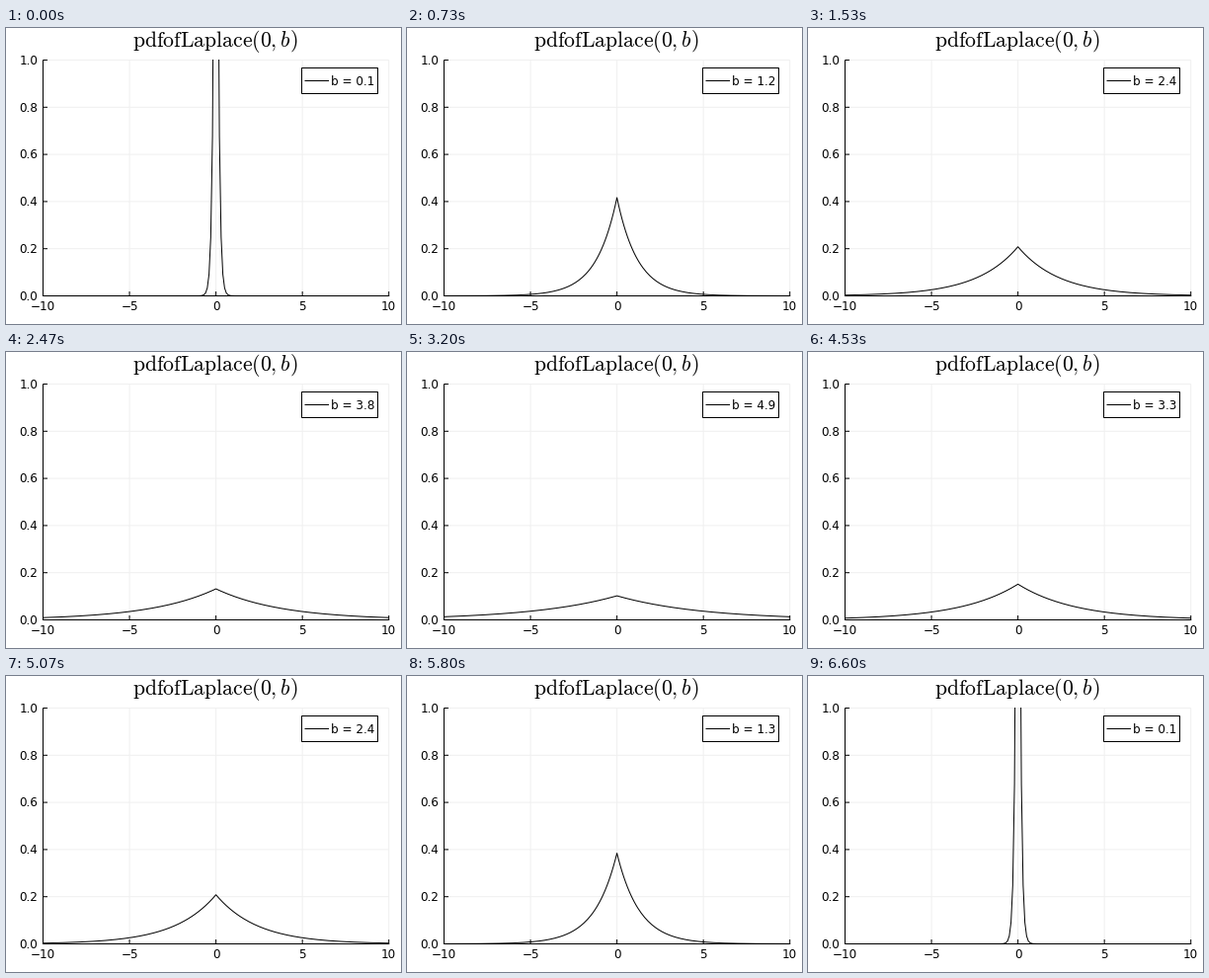
Write a matplotlib script that moves like this. It is 400 px wide and 300 px high and loops after 6670 ms.

```python
import numpy as np
import matplotlib.pyplot as plt
from matplotlib.animation import FuncAnimation
from matplotlib.collections import LineCollection
from matplotlib.patches import Rectangle

W, H, DPI = 400, 300, 100
LEFT, RIGHT, TOP, BOTTOM = 37.5, 387.7, 32.5, 271.5
LOOP_MS, TICK_MS, STEPS = 6670, 10, 100
PX = 72 / DPI  # one pixel in points

plt.rcParams.update({
    "font.family": "DejaVu Sans",
    "font.size": 12 * PX,
    "mathtext.fontset": "cm",
    "path.snap": False,
})

# One layer in pixel coordinates, y pointing down
fig = plt.figure(figsize=(W / DPI, H / DPI), dpi=DPI, facecolor="white")
ax = fig.add_axes([0, 0, 1, 1])
ax.set(xlim=(0, W), ylim=(H, 0))
ax.axis("off")


def to_x(v):
    return LEFT + (v + 10) / 20 * (RIGHT - LEFT)


def to_y(v):
    return BOTTOM - v * (BOTTOM - TOP)


def label(x, y, text, ha):
    return ax.text(x, y, text, ha=ha, va="center_baseline", zorder=5)


def strokes(segments, color, z):
    ax.add_collection(LineCollection(segments, colors=color, linewidths=PX,
                                     zorder=z), autolim=False)


grid = []
axes = [[(LEFT, TOP), (LEFT, BOTTOM + 0.5)],
        [(LEFT - 0.5, BOTTOM), (RIGHT + 0.5, BOTTOM)]]

for v in np.linspace(-10, 10, 5):
    x = to_x(v)
    grid.append([(x, TOP), (x, BOTTOM)])
    axes.append([(x, BOTTOM), (x, BOTTOM - 4.5)])
    label(x, 281, f"{v:.0f}".replace("-", "\u2212"), "center")

for v in np.linspace(0, 1, 6):
    y = to_y(v)
    grid.append([(LEFT, y), (RIGHT, y)])
    axes.append([(LEFT, y), (LEFT + 4.5, y)])
    label(32.5, y - 0.6, f"{v:.1f}", "right")

strokes(grid, "#f0f0f0", 1)
strokes(axes, "black", 2)

ax.text(211.3, 19, r"$\mathrm{pdf of Laplace}(0, b)$", ha="center",
        va="baseline", fontsize=21.7 * PX)

ax.add_patch(Rectangle((299.5, 40.5), 77, 26, fc="white", ec="black",
                       lw=PX, zorder=4))
strokes([[(302.5, 53.5), (327, 53.5)]], "black", 5)
legend = label(329, 53.5, "", "left")

xs = np.linspace(-10, 10, 201)
curve, = ax.plot([], [], color="black", lw=PX, zorder=3)
curve.set_clip_path(Rectangle((LEFT, TOP - 0.5), RIGHT - LEFT,
                              BOTTOM - TOP + 1, transform=ax.transData))


def update(tick):
    # Steps start on the nearest 10 ms tick
    step = int((tick + 0.5) * TICK_MS * STEPS / LOOP_MS)
    b = (min(step, STEPS - 1 - step) + 1) / 10
    curve.set_data(to_x(xs), to_y(np.exp(-np.abs(xs) / b) / (2 * b)))
    legend.set_text(f"b = {b:.1f}")
    return curve, legend


anim = FuncAnimation(fig, update, frames=LOOP_MS // TICK_MS, interval=TICK_MS,
                     repeat=True, repeat_delay=0)
plt.show()
```
